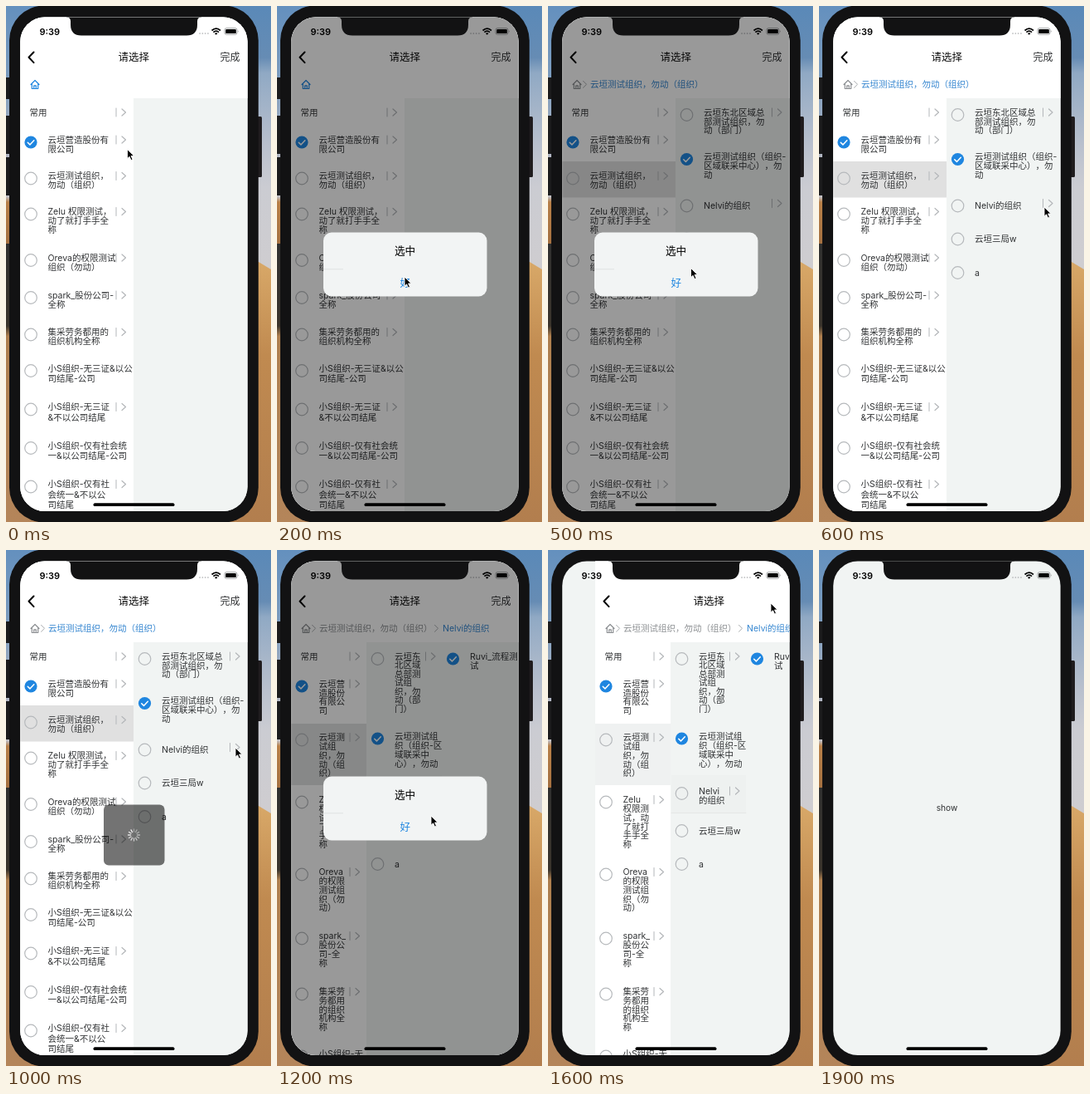
Animation, 320 px wide and 621 px high, one loop 2 s. Source, as an HTML page:

```html
<!DOCTYPE html>
<html lang="zh-CN">
<head>
<meta charset="utf-8">
<style>
html, body { margin: 0; width: 100%; height: 100%; overflow: hidden; }
svg { display: block; width: 320px; height: 621px; }
text {
  font: 10.5px Inter, "Noto Sans CJK SC", "Noto Sans CJK", sans-serif;
  fill: #303234;
  text-spacing-trim: space-all;
  font-feature-settings: "chws" 0, "halt" 0;
}
.line { fill: none; stroke-linecap: round; stroke-linejoin: round; }
</style>
</head>
<body>
<svg viewBox="0 0 320 621">
  <defs>
    <linearGradient id="left" x2="0" y2="1">
      <stop offset="0" stop-color="#6490be"/><stop offset=".14" stop-color="#7c9cbe"/>
      <stop offset=".3" stop-color="#b4b7c2"/><stop offset=".37" stop-color="#c0bec2"/>
      <stop offset=".38" stop-color="#b88048"/><stop offset=".46" stop-color="#a47040"/>
      <stop offset=".46" stop-color="#30302f"/><stop offset=".62" stop-color="#3a342c"/>
      <stop offset=".64" stop-color="#ae7f4e"/><stop offset="1" stop-color="#b4855a"/>
    </linearGradient>
    <linearGradient id="right" x2="0" y2="1">
      <stop offset="0" stop-color="#5a89b8"/><stop offset=".1" stop-color="#668cb4"/>
      <stop offset=".13" stop-color="#90a9c4"/><stop offset=".27" stop-color="#b9c0cd"/>
      <stop offset=".35" stop-color="#cbccd2"/><stop offset=".52" stop-color="#cfcdd0"/>
    </linearGradient>
    <linearGradient id="dune" x2="0" y2="1">
      <stop offset="0" stop-color="#d8a868"/><stop offset=".36" stop-color="#c08a50"/>
      <stop offset="1" stop-color="#b27e4e"/>
    </linearGradient>
    <clipPath id="screen"><rect x="17.200" y="13.500" width="274.400" height="594.500" rx="29.500"/></clipPath>
  </defs>
  <rect width="160" height="621" fill="url(#left)"/>
  <rect x="160" width="160" height="621" fill="url(#right)"/>
  <path d="M160 308h145l15 9v304h-160z" fill="url(#dune)"/>
  <path d="M0 86h5v26h-5zM0 132h5v46h-5zM0 182h5v46h-5z" fill="#1b1b1c"/>
  <rect x="302" y="133" width="7" height="73" rx="1.500" fill="#1f1c1e"/>
  <rect x="4" y="-.5" width="300.800" height="622" rx="42" fill="#121213"/>
  <g clip-path="url(#screen)">
    <rect x="17" y="13" width="275" height="595" fill="#f1f4f3"/>
    <text x="154.500" y="314.300" text-anchor="middle" style="font-size:10.2px">show</text>
    <g id="page"></g>
    <text x="40.500" y="34.600" style="font-size:11px;font-weight:600;fill:#000">9:39</text>
    <path d="M234 33h.1M237.300 33h.1M240.600 33h.1M243.900 33h.1" class="line" stroke="#b4b6b8" stroke-width="1.700"/>
    <path d="M248.500 29.500q5.200-4.600 10.400 0M250.400 31.600q3.300-2.800 6.600 0" fill="none" stroke="#000" stroke-width="1.700"/>
    <path d="M251.900 32.900q1.800-1.400 3.600 0l-1.800 1.800z"/>
    <rect x="264" y="26.700" width="15" height="7.600" rx="2.200" fill="none" stroke="#8a8c8e" stroke-width=".8"/>
    <rect x="265.200" y="27.900" width="12.600" height="5.200" rx="1.200"/>
    <path d="M280.100 29.200q1.400 1.300 0 2.600z" fill="#8a8c8e"/>
    <g id="modal"></g>
    <path d="M73 13v.5q5 0 5 5v4q0 13 13 13h127q13 0 13-13v-4q0-5 5-5v-.5z" fill="#121213"/>
    <rect x="105.500" y="598.300" width="98" height="3.700" rx="1.850"/>
  </g>
  <g id="cursor"><path d="M0 0v11.200l2.600-2.400 1.900 4.300 2-.9-1.900-4.200h3.600z" stroke="#fff" stroke-width=".9"/></g>
</svg>
<script>
const $ = id => document.getElementById(id);
const BLUE = '#1f86e0', LINK = '#3586d0', GRAY = '#8d9093';

const text = (s, x, y, style = '') =>
  `<text x="${x}" y="${y + 3.9}" style="${style}">${s.replace(/&/g, '&amp;')}</text>`;
const rect = (x, y, w, h, fill, r = 0) =>
  `<rect x="${x}" y="${y}" width="${w}" height="${h}" rx="${r}" fill="${fill}"/>`;
const line = (d, color, w, more = '') =>
  `<path class="line" d="${d}" stroke="${color}" stroke-width="${w}" ${more}/>`;
const arrow = (x, y) =>
  line(`M${x} ${y - 5}v10`, '#b4b7ba', 1) + line(`M${x + 7} ${y - 4}l4.500 4-4.500 4`, '#b4b7ba', 1.2);

function radio(x, y, on) {
  return on
    ? `<circle cx="${x}" cy="${y}" r="7.600" fill="${BLUE}"/>` +
      line(`M${x - 3.8} ${y + .2}l2.700 2.700 4.900-5.200`, '#fff', 1.5)
    : `<circle cx="${x}" cy="${y}" r="7.300" fill="none" stroke="#b6b9bc" stroke-width="1.200"/>`;
}

// Row: [centre y, lines joined by |, flags (c = checked, n = no arrow), line height]
function column(rows, left, bar, checked = true) {
  return rows.map(([y, label, flags = '', step = 10.7]) => {
    const lines = label.split('|');
    const top = lines.length > 1 ? y - 3 : y;
    return radio(left, y, flags.includes('c') && checked) +
      lines.map((s, i) => text(s, left + 20.5, top + i * step)).join('') +
      (flags.includes('n') ? '' : arrow(bar, y - 3));
  }).join('');
}

const wide = [
  [164, '云垣营造股份有|限公司', 'c'],
  [207.5, '云垣测试组织，|勿动（组织）'],
  [250.5, 'Zelu 权限测试，|动了就打手手全|称', '', 11],
  [306, 'Oreva的权限测试|组织（勿动）', '', 11],
  [351, 'spark_股份公司-|全称', '', 11],
  [395.5, '集采劳务都用的|组织机构全称'],
  [439, '小S组织-无三证&以公|司结尾-公司', 'n', 12],
  [485.5, '小S组织-无三证|&不以公司结尾', '', 12.3],
  [532, '小S组织-仅有社会统|一&以公司结尾-公司', 'n', 12.3],
  [578.5, '小S组织-仅有社|会统一&不以公|司结尾', '', 12.1]
];
const second = [
  [131, '云垣东北区域总|部测试组织，勿|动（部门）'],
  [184.5, '云垣测试组织（组织-|区域联采中心），勿|动', 'cn', 11],
  [240.5, 'Nelvi的组织'],
  [280.5, '云垣三局w', 'n'],
  [321, 'a', 'n']
];
const narrow = [
  [164, '云垣营|造股份|有限公|司', 'c'],
  [228.5, '云垣测|试组|织，勿|动（组|织）'],
  [303.5, 'Zelu|权限测|试，动|了就打|手手全|称'],
  [390.5, 'Oreva|的权限|测试组|织（勿|动）'],
  [467.5, 'spark_|股份公|司-全|称', '', 11],
  [534.5, '集采劳|务都用|的组织|机构全|称', '', 10.6],
  [609.5, '小S组织-无|三证', 'n', 12]
];
const middle = [
  [131, '云垣东|北区域|总部测|试组|织，勿|动（部|门）', '', 10.5],
  [227, '云垣测试组|织（组织-区|域联采中|心），勿动', 'cn', 11.1],
  [293, 'Nelvi|的组织'],
  [338, '云垣三局w', 'n'],
  [378, 'a', 'n']
];
const last = [[131, 'Ruvi_流程测|试', 'cn', 11.5]];

function header(cols) {
  const crumb = (s, x, on) => text(s, x, 94.3, `fill:${on ? LINK : GRAY}`);
  const sep = x => line(`M${x} 90.300l4 4-4 4`, '#a9acaf', 1);
  return rect(17, 13, 275, 98, '#fff') +
    line('M33.500 55.500l-6 6.300 6 6.300', '#000', 2) +
    text('请选择', 135.5, 62, 'font-size:12.500px;font-weight:500;fill:#111') +
    text('完成', 258.5, 62, 'font-size:12px') +
    line('M30 94.500l5-5 5 5M31.300 93.500v6h7.400v-6M33.700 99.500v-3.700h2.600v3.700', cols > 1 ? GRAY : BLUE, 1.2) +
    (cols > 1 ? sep(42.5) + crumb('云垣测试组织，勿动（组织）', 51, cols == 2) : '') +
    (cols > 2 ? sep(190.5) + crumb('Nelvi的组织', 200, true) : '');
}

function page({ cols, checked, checked2, checked3, faded }) {
  const many = cols == 3, edge = many ? 108 : 154, bar = many ? 88 : 133;
  let s = rect(17, 13, 275, 595, '#f1f4f3') + header(cols) + rect(17, 111, edge - 17, 497, '#fff');
  if (cols == 2) s += rect(17, 187, 137, 43.5, '#e0e0e0');
  if (many) {
    s += rect(17, 209, 91, 74, faded ? '#eff1f1' : '#e0e2e2') + rect(109, 271, 90, 45.5, '#eef1f0') +
      line('M109 316.500h90', '#e2e5e4', .8);
  }
  s += text('常用', 28.5, 128) + arrow(bar, 128) + column(many ? narrow : wide, 30, bar, checked);
  if (cols == 2) s += column(second, 167.5, 270.5, checked2);
  if (many) s += column(middle, 121.5, 179.5) + column(last, 212.5, 270, checked3);
  return s;
}

function alertBox() {
  return rect(17, 13, 275, 595, 'rgba(0,0,0,.4)') + rect(56, 272.5, 197.5, 77, '#f2f4f4', 10) +
    rect(56, 316.5, 24, .7, '#d8dbdb') +
    text('选中', 142, 295, 'font-size:12.600px;font-weight:500;fill:#000') +
    text('好', 148.6, 333.6, `font-size:12.500px;fill:${BLUE}`);
}

function spinner() {
  let s = rect(118, 306.5, 73.5, 73, 'rgba(0,0,0,.55)', 6);
  for (let i = 0; i < 12; i++)
    s += line('M154.500 339v-3', '#fff', 1.3, `opacity="${.35 + i * .05}" transform="rotate(${i * 30} 154.500 343)"`);
  return s;
}

const one = { cols: 1, checked: true };
const two = { cols: 2, checked: true, checked2: true };
const three = { cols: 3, checked: true, checked3: true };
const faded = { ...three, faded: true };
// Scene: [start in ms, cursor position, page state, overlay, slide distance]
const scenes = [
  [0, [146.5, 172.5], { cols: 1 }],
  [100, [33, 165], one],
  [200, [154, 326], one, alertBox],
  [300, [141.5, 200.5], one],
  [400, [167, 186], { ...two, checked2: false }],
  [500, [172.5, 315.5], two, alertBox],
  [600, [272, 242], two],
  [1000, [277, 238], two, spinner],
  [1100, [213, 133], { ...three, checked3: false }],
  [1200, [186, 320], three, alertBox],
  [1300, [196, 256.5], faded],
  [1400, [232, 140], faded],
  [1500, [267, 66], faded],
  [1600, [269, 64], faded, null, 40],
  [1700, [269, 64], faded, null, 190],
  [1800, [269, 64], faded, null, 262],
  [1900, [-50, -50], faded, null, 275]
];

const start = performance.now();
let shown;
function draw() {
  const t = (performance.now() - start) % 2000;
  const scene = scenes.findLast(s => s[0] <= t);
  if (scene !== shown) {
    shown = scene;
    const [, at, state, overlay, slide = 0] = scene;
    $('page').innerHTML = page(state);
    $('page').setAttribute('transform', `translate(${slide})`);
    $('modal').innerHTML = overlay ? overlay() : '';
    $('cursor').setAttribute('transform', `translate(${at})`);
  }
  requestAnimationFrame(draw);
}
draw();
</script>
</body>
</html>
```
